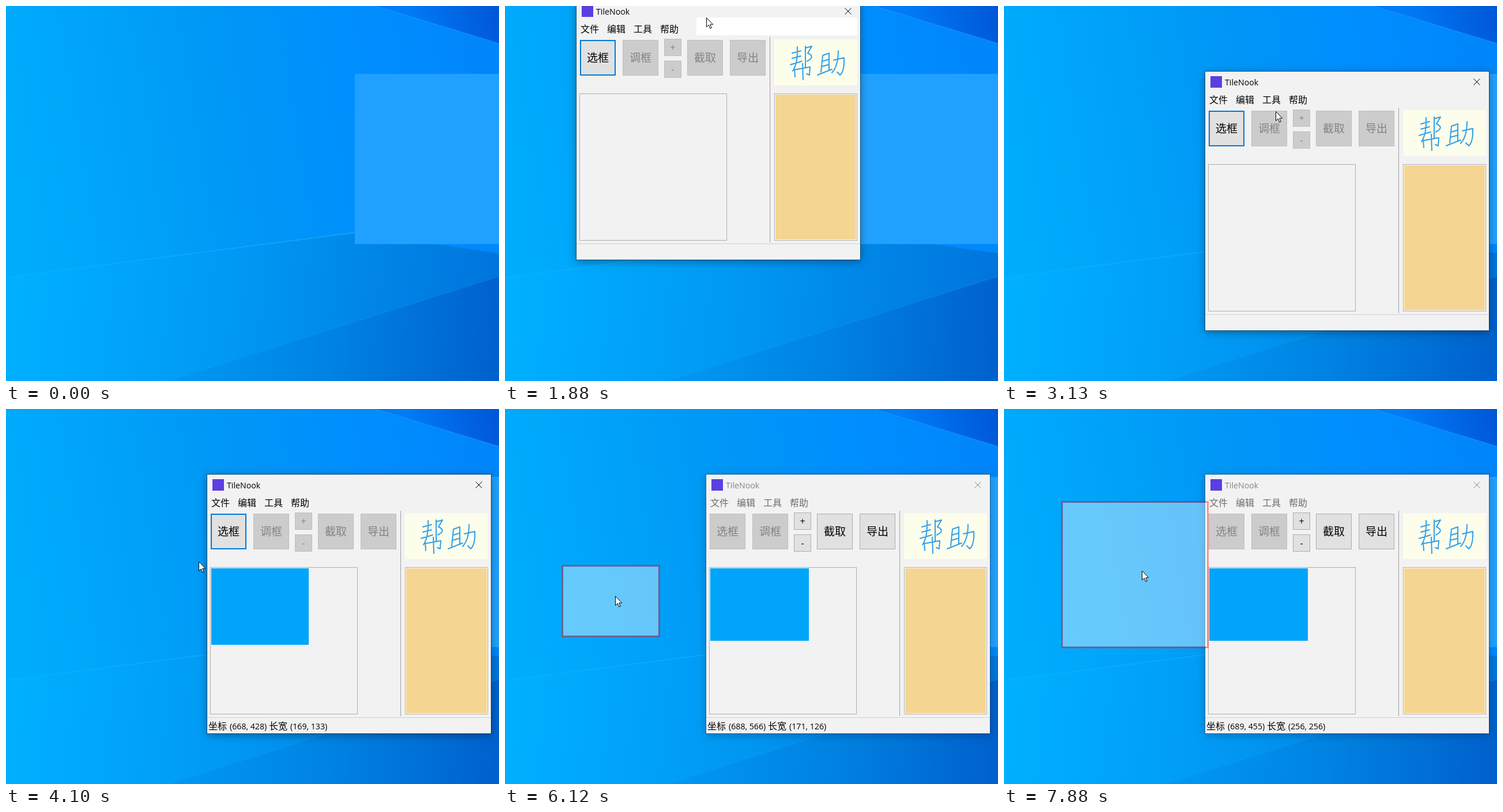
Animation of 855x652 px, one loop 8000 ms. Source, as an HTML page with a canvas:

```html
<!DOCTYPE html>
<html lang="zh-CN">
<head>
<meta charset="utf-8">
<style>
html, body { margin: 0; width: 100%; height: 100%; overflow: hidden; background: #009cf8; }
canvas { display: block; }
</style>
</head>
<body>
<canvas id="stage" width="855" height="652"></canvas>
<script>
const W = 855, H = 652, LOOP = 8000;
const OPEN = 1090, LIVE = 1300, STEP = 6580 / 57;
const ctx = document.getElementById('stage').getContext('2d');
const LATIN = '"Open Sans", "Noto Sans", sans-serif';
const CJK = '"Noto Sans CJK SC", "Noto Sans CJK", sans-serif';

// Moments of the demo, in ms
const GRAB = 1877, DROP = 2761, PICK = 3250, REPICK = 4280, ADJUST = 5500, ENLARGE = 7130;
const FIRST = { from: 3500, to: 3740, done: 3860, x: 78, y: 133, w: 169, h: 133 };
const SECOND = { from: 4580, to: 4920, done: 5030, x: 98, y: 271, w: 171, h: 126 };
const LIFT = { from: 6100, to: 6560, dx: 3, dy: -67 };
const RAISE = { from: 7450, to: 7870, dx: -2, dy: -44 };

const HANDWRITING = new Path2D(
  'M31 24 46 20M31 33 46 29M28 44 48 38M40 13Q41 42 32 55' +
  'M54 12V48M54 15 65 12 58 24Q72 30 57 38' +
  'M35 52 36 65M35 53 62 48 61 62 56 60M49 42 50 70' +
  'M84 28 81 57M84 28 95 24V54M84 38 94 35M83 47 94 44M75 62 100 52' +
  'M103 36 121 32Q122 55 114 62L109 57M111 20Q111 46 100 58');
const ARROW = new Path2D('M.5 .5V16.5L4.2 13 6.8 19 9.2 18 6.7 12.2H11.7Z');

const clamp = v => Math.min(1, Math.max(0, v));
const ratio = (t, a, b) => clamp((t - a) / (b - a));
const smooth = k => k * k * (3 - 2 * k);
const easeOut = (k, n) => 1 - (1 - k) ** n;
const between = (t, a, b) => t >= a && t < b;
const progress = (t, { from, to }) => smooth(ratio(t, from, to));

// The screen is refreshed at a slow, even rate
const stepped = t => t < LIVE ? t : LIVE + Math.floor((t - LIVE) / STEP + 0.001) * STEP;

function windowAt(t) {
  const k = ratio(t, GRAB, DROP);
  return [Math.round(124 + 225 * easeOut(k, 2)), Math.round(-9 + 123 * easeOut(k, 4))];
}

function selectionAt(t) {
  if (t < ADJUST) {
    const shot = t < SECOND.from ? FIRST : SECOND, k = progress(t, shot);
    return [shot.x, shot.y, Math.round(shot.w * k), Math.round(shot.h * k)];
  }
  const a = progress(t, LIFT), b = progress(t, RAISE);
  const size = t < ENLARGE ? [SECOND.w, SECOND.h] : [256, 256];
  return [
    Math.round(SECOND.x + LIFT.dx * a + RAISE.dx * b),
    Math.round(SECOND.y + LIFT.dy * a + RAISE.dy * b),
    ...size
  ];
}

// Smooth travel through [time, x, y] stops
function glide(t, stops) {
  const i = stops.findIndex(s => t < s[0]);
  if (i < 1) return (i ? stops[stops.length - 1] : stops[0]).slice(1);
  const [t0, x0, y0] = stops[i - 1], [t1, x1, y1] = stops[i];
  const k = smooth(ratio(t, t0, t1));
  return [Math.round(x0 + (x1 - x0) * k), Math.round(y0 + (y1 - y0) * k)];
}

const drawBox = ({ from, to, x, y, w, h }) => [[from, x, y], [to, x + w, y + h]];
const drag = ({ from, to, dx, dy }, x, y) => [[from, x, y], [to, x + dx, y + dy]];
const ROUTE = [
  [DROP, 578, 143], [PICK, 394, 212],
  ...drawBox(FIRST), [4060, 334, 265], [REPICK, 388, 216],
  ...drawBox(SECOND), [5220, 441, 273], [ADJUST, 460, 216],
  ...drag(LIFT, 181, 329), [6950, 519, 208], [ENLARGE, 519, 207],
  ...drag(RAISE, 241, 325)
];

function pointerAt(t) {
  if (t < GRAB) return glide(t, [[LIVE, 430, -40], [GRAB, 349, 20]]);
  if (t > DROP) return glide(t, ROUTE);
  const [x, y] = windowAt(t);
  return [x + Math.round(225 + 4 * ratio(t, GRAB, GRAB + STEP)), y + 29];
}

function rect(x, y, w, h, fill) {
  ctx.fillStyle = fill;
  ctx.fillRect(x, y, w, h);
}

function frame(x, y, w, h, color, line = 1) {
  ctx.strokeStyle = color;
  ctx.lineWidth = line;
  ctx.strokeRect(x + line / 2, y + line / 2, w - line, h - line);
}

function text(str, x, y, size, family, color, align = 'left') {
  ctx.font = size + 'px ' + family;
  ctx.fillStyle = color;
  ctx.textAlign = align;
  ctx.fillText(str, x, y);
}

function line(x1, y1, x2, y2, color) {
  ctx.strokeStyle = color;
  ctx.lineWidth = 1;
  ctx.beginPath();
  ctx.moveTo(x1, y1);
  ctx.lineTo(x2, y2);
  ctx.stroke();
}

function blend(x1, y1, x2, y2, ...colors) {
  const g = ctx.createLinearGradient(x1, y1, x2, y2);
  colors.forEach((c, i) => g.addColorStop(i / (colors.length - 1), c));
  return g;
}

function polygon(path, fill) {
  ctx.fillStyle = fill;
  ctx.fill(new Path2D(path));
}

function drawDesktop() {
  rect(0, 0, W, H, blend(0, 320, W, 180, '#00adfd', '#00a2f8', '#0096f6', '#008eff', '#0086fa'));
  polygon('M0 472 605 394 855 430V652H0Z',
    blend(0, 500, W, 590, '#00b0ff', '#00a4fa', '#0096f2', '#0084e6', '#0074dc'));
  polygon('M280 652 855 470V652Z', blend(280, 600, W, 640, '#009af2', '#0082e2', '#0060cc'));
  polygon('M640 0 855 65V0Z', blend(700, 40, W, 0, '#007cf6', '#0068e6', '#0056d6'));
  line(640, 0, W, 65, 'rgba(60,170,255,.5)');
  line(0, 472, 605, 394, blend(0, 0, 605, 0, 'rgba(40,190,255,.3)', 'rgba(50,200,255,.7)'));
  line(280, H, W, 470, 'rgba(40,160,255,.3)');
  rect(605, 118, 296, 296, '#21a1ff');
}

function button(label, x, y, size, enabled, focused) {
  const big = size > 40;
  rect(x, y, size, size, enabled ? '#e1e1e1' : '#cccccc');
  frame(x, y, size, size, focused ? '#0078d7' : enabled ? '#adadad' : '#bfbfbf', focused ? 2 : 1);
  text(label, x + size / 2, y + size / 2 + (big ? 7 : 6), big ? 19 : 16,
    big ? CJK : LATIN, enabled ? '#000' : '#838383', 'center');
}

function drawStatus([x, y, w, h]) {
  [['坐标', x + 590, y + 295], ['长宽', w, h]].forEach(([label, a, b], i) => {
    text(label, 2 + 105 * i, 443, 16, CJK, '#000');
    text(`(${a}, ${b})`, 39 + 105 * i, 443, 14.2, LATIN, '#000');
  });
}

function drawWindow(t, sel) {
  const adjusting = t >= ADJUST;
  const selecting = between(t, PICK, FIRST.done) || between(t, REPICK, SECOND.done);
  const active = !adjusting && !selecting;
  const hasShot = t >= SECOND.done;
  const ink = active ? '#000' : '#6d6d6d';
  const titleInk = active ? '#000' : '#858585';

  ctx.save();
  ctx.translate(...windowAt(t));
  ctx.save();
  if (t >= LIVE) {
    ctx.shadowColor = `rgba(0,0,0,${active ? 0.38 : 0.26})`;
    ctx.shadowBlur = 14;
    ctx.shadowOffsetY = 3;
  }
  rect(0, 0, 492, 450, '#f2f2f2');
  ctx.restore();
  frame(-1, -1, 494, 452, active ? 'rgba(0,40,70,.65)' : 'rgba(0,40,70,.4)');

  rect(9, 8, 20, 20, '#5c3fe0');
  text('TileNook', 34, 24, 14.2, LATIN, titleInk);
  line(465.5, 12.5, 476.5, 23.5, titleInk);
  line(476.5, 12.5, 465.5, 23.5, titleInk);
  if (t < GRAB + STEP / 2) rect(208, 29, 279, 31, '#fff');
  ['文件', '编辑', '工具', '帮助'].forEach((s, i) => text(s, 7 + 46 * i, 55, 16, CJK, ink));

  button('选框', 6, 68, 62, active, active);
  button('调框', 80, 68, 62, hasShot && active);
  button('+', 152, 66, 30, adjusting);
  button('-', 152, 104, 30, adjusting);
  button('截取', 192, 68, 62, hasShot);
  button('导出', 266, 68, 62, hasShot);

  line(335.5, 63, 335.5, 420, '#a0a0a0');
  rect(343, 67, 144, 80, '#fdfdec');
  ctx.save();
  ctx.translate(343, 67);
  ctx.lineCap = ctx.lineJoin = 'round';
  ctx.strokeStyle = '#2f9fea';
  ctx.lineWidth = 2;
  ctx.stroke(HANDWRITING);
  ctx.restore();

  rect(343, 161, 144, 256, '#fff');
  frame(343, 161, 144, 256, '#adadad');
  rect(345, 163, 140, 252, '#f5d592');

  frame(5, 161, 256, 256, '#adadad');
  const shot = hasShot ? SECOND : FIRST;
  if (t >= FIRST.done) rect(7, 163, shot.w, shot.h, '#00a5f9');

  line(0, 422.5, 492, 422.5, '#d0d0d0');
  if (t >= FIRST.from) drawStatus(sel);
  ctx.restore();
}

function drawSelection([x, y, w, h]) {
  if (w < 7 || h < 7) return;
  ctx.save();
  ctx.globalAlpha = 0.4;
  rect(x + 3, y + 3, w - 6, h - 6, '#fff');
  frame(x, y, w, h, '#f00', 3);
  ctx.restore();
}

function drawPointer(t) {
  ctx.save();
  ctx.translate(...pointerAt(t));
  ctx.fillStyle = '#fff';
  ctx.strokeStyle = '#000';
  ctx.lineWidth = 1;
  ctx.fill(ARROW);
  ctx.stroke(ARROW);
  ctx.restore();
}

function draw(now) {
  const t = stepped(now % LOOP), sel = selectionAt(t);
  const selecting = [FIRST, SECOND].some(s => between(t, s.from, s.done));
  drawDesktop();
  if (t >= OPEN) drawWindow(t, sel);
  if (selecting || t >= ADJUST) drawSelection(sel);
  if (t >= LIVE) drawPointer(t);
}

const start = performance.now();
function tick() {
  draw(performance.now() - start);
  requestAnimationFrame(tick);
}
tick();
</script>
</body>
</html>
```
